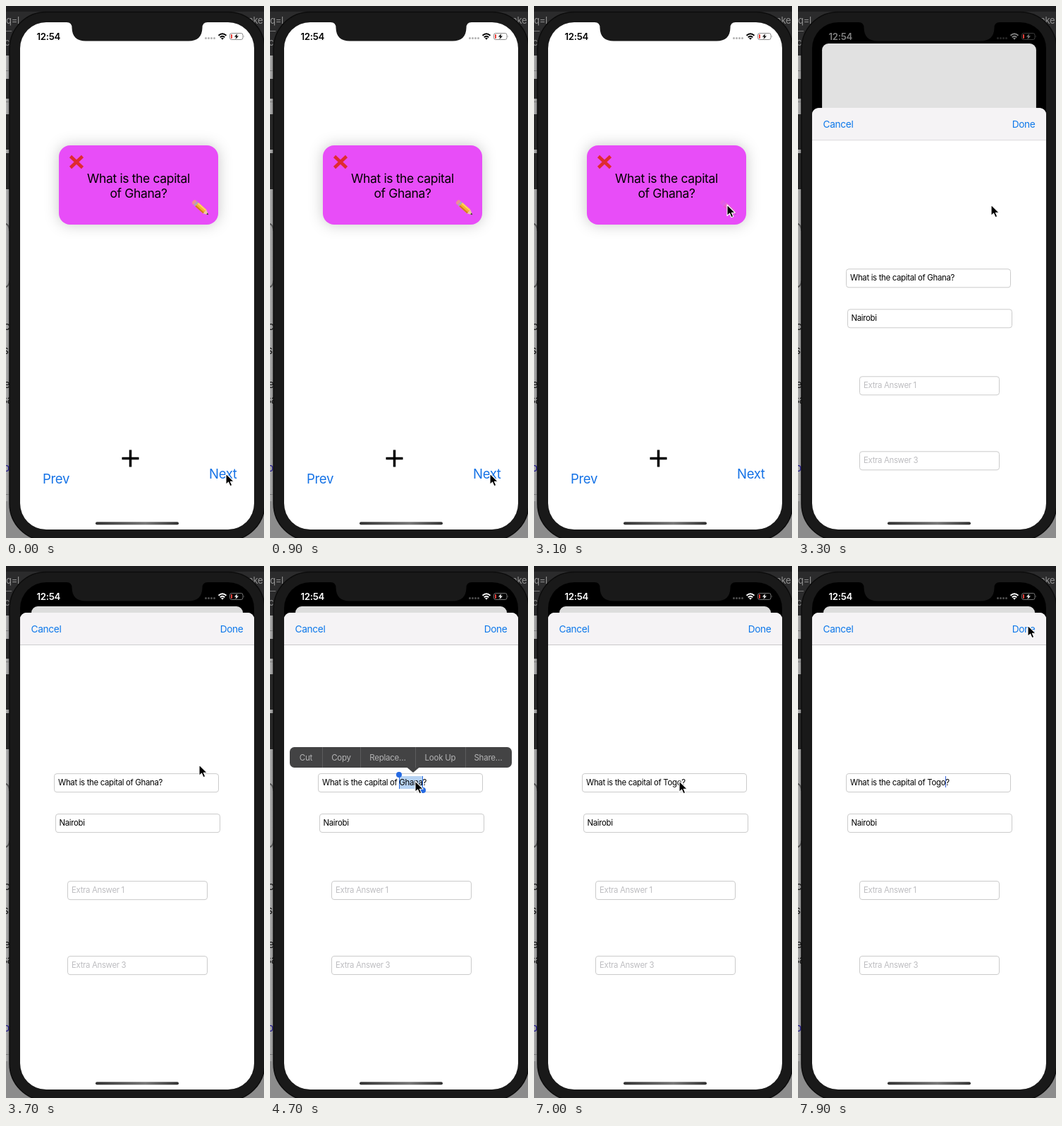
Write an HTML page that moves like this. It is 366 px wide and 752 px high and loops after 8000 ms.

```html
<!DOCTYPE html>
<html lang="en">
<head>
<meta charset="utf-8">
<title>Flashcards</title>
<style>
  html, body { margin: 0; width: 100%; height: 100%; overflow: hidden; background: #1a1a1a; }
  body { font-family: Inter, "Liberation Sans", sans-serif; }
  svg { display: block; }
  text, .text { letter-spacing: -.02em; }
  #stage { position: relative; width: 366px; height: 752px; overflow: hidden; }
  #stage > svg { position: absolute; left: 0; top: 0; }
  #screen { position: absolute; left: 20px; top: 23px; width: 332px; height: 717px;
    border-radius: 37px; overflow: hidden; background: #000; }
  #screen > * { position: absolute; left: 0; top: 0; }
  #page { width: 332px; height: 717px; border-radius: 10px; overflow: hidden;
    background: #fff; transform-origin: 50% 0; }
  #shade { position: absolute; inset: 0; background: #000; }
  #sheet { width: 332px; height: 717px; background: #fff; border-radius: 9px 9px 0 0; }
  #bar { height: 45px; background: #f5f3f5; border-bottom: 1px solid #c9c8ca;
    border-radius: 9px 9px 0 0; }
  #bar span { position: absolute; top: 0; line-height: 46px; font-size: 13.7px; color: #0d78ea; }
  .field { position: absolute; box-sizing: border-box; height: 27px; padding-left: 5px;
    border: 1px solid #cbcbcb; border-radius: 4px; background: #fff;
    font-size: 11.4px; line-height: 25px; white-space: pre; color: #000; }
  .hint { color: #bdbdc0; }
  #caret { position: relative; }
  #caret::after { content: ""; position: absolute; left: -.5px; top: -2px;
    width: 1.5px; height: 16px; background: #3763d8; }
  #word { position: relative; }
  #word.on::before { content: ""; position: absolute; z-index: -1; left: 0; right: 0; top: -2px;
    height: 18px; background: #b7d3f3; border: solid #2a6be0; border-width: 0 1.5px;
    box-sizing: border-box; }
  #question { z-index: 0; }
  .knob { display: none; position: absolute; width: 8px; height: 8px; border-radius: 50%; background: #266ae2; }
  #word.on .knob { display: block; }
  .knob.start { left: -4px; top: -8px; }
  .knob.end { right: -4px; top: 14px; }
</style>
</head>
<body>
<div id="stage">
  <svg width="366" height="752">
    <defs>
      <linearGradient id="strip"><stop stop-color="#b2b2b2"/><stop offset="1" stop-color="#777"/></linearGradient>
    </defs>
    <rect width="366" height="752" fill="#8c8c8c"/>
    <rect width="6" height="700" fill="url(#strip)"/>
    <rect width="366" height="70" fill="#2b2b2c"/>
    <rect width="366" height="8" fill="#1d1d1e"/>
    <path d="M0 35.5H8M0 91.5H6M0 135.5H6M0 690.5H6" stroke="#777"/>
    <g font-size="13" fill="#909090">
      <text x="0" y="25">q=l</text><text x="343" y="25">nke</text><text x="-2" y="56">c</text>
    </g>
    <path d="M-2 307Q5 309 5 318M-2 398Q5 396 5 388" fill="none" stroke="#555" stroke-width="2"/>
    <g font-size="15" fill="#151515">
      <text x="-3" y="458">c</text><text x="-4" y="492">s</text>
      <text x="-3" y="540">e</text><text x="-6" y="562">sa</text>
      <text x="-4" y="658" fill="#221a8c">p</text>
    </g>
    <g fill="#272727">
      <rect x="-2" y="103" width="8" height="28" rx="1"/>
      <rect x="-2" y="153" width="8" height="50" rx="1"/>
      <rect x="-2" y="208" width="8" height="51" rx="1"/>
    </g>
    <rect x="5" y="8.5" width="362" height="747" rx="52" fill="#191919" stroke="#0c0c0c" stroke-width="1.5"/>
  </svg>

  <div id="screen">
    <div id="page">
      <svg width="332" height="717" viewBox="20 23 332 717">
        <rect x="75" y="197" width="226" height="112" rx="16" fill="#e84df8"
          style="filter:drop-shadow(0 0 10px rgba(0,0,0,.22))"/>
        <g font-size="17.5" text-anchor="middle">
          <text x="188" y="249.5">What is the capital</text>
          <text x="188" y="271">of Ghana?</text>
        </g>
        <path d="M91.5 212.5L108.500 228.500M108.500 212.500L91.500 228.500" stroke="#df2b30" stroke-width="4.6"/>
        <g id="pencil" transform="translate(265.500 276) rotate(41.500)">
          <path d="M2-3.500H4V3.500H2Q-.5 3.500-.5 0T2-3.500" fill="#ec8f96"/>
          <path d="M4-3.500H7V3.500H4Z" fill="#a9adb3"/>
          <path d="M7-3.500H22V3.500H7Z" fill="#f6b32e"/>
          <path d="M7-3.500H22V-1.300H7Z" fill="#fdd35c"/>
          <path d="M7 1.500H22V3.500H7Z" fill="#cf7d1e"/>
          <path d="M22-3.500L29 0L22 3.500Z" fill="#eccb9c"/>
          <path d="M26.200-1.400L29 0L26.200 1.400Z" fill="#333"/>
        </g>
        <path d="M164.500 639.500H188.500M176.500 627.500V651.500" stroke="#000" stroke-width="3.5"/>
        <g font-size="18.6" fill="#1673e6">
          <text id="prev" x="52" y="674.500">Prev</text>
          <text id="next" x="288" y="668">Next</text>
        </g>
      </svg>
      <div id="shade"></div>
    </div>

    <div id="sheet" class="text">
      <div id="bar"><span style="left:15.500px">Cancel</span><span style="right:15.500px">Done</span></div>
      <div class="field" id="question" style="left:48px;top:227px;width:234px">What is the capital of <span id="word"><span id="typed"></span><i class="knob start"></i><i class="knob end"></i></span><span id="caret"></span>?</div>
      <div class="field" style="left:49.500px;top:284px;width:234px">Nairobi</div>
      <div class="field hint" style="left:67px;top:379px;width:199px">Extra Answer 1</div>
      <div class="field hint" style="left:67px;top:484.500px;width:199px">Extra Answer 3</div>
    </div>

    <svg width="332" height="717" viewBox="20 23 332 717">
      <g id="menu">
        <rect x="28" y="256" width="315" height="29" rx="6.500" fill="#434344"/>
        <path d="M194 284.500H212L203 292Z" fill="#434344"/>
        <path d="M74.500 256V285M128.500 256V285M206.500 256V285M277.500 256V285" stroke="#5c5c5d"/>
        <g font-size="11.500" fill="#b4b4b5" text-anchor="middle">
          <text x="51" y="274.500">Cut</text><text x="101" y="274.500">Copy</text>
          <text x="167" y="274.500">Replace…</text><text x="241.500" y="274.500">Look Up</text>
          <text x="309.500" y="274.500">Share…</text>
        </g>
      </g>
      <path d="M86 22V23Q93.500 23 93.500 31Q94 49.500 113 49.500H259Q278 49.500 278.500 31Q278.500 23 286 23V22Z" fill="#191919"/>
      <g id="status">
        <text x="43.500" y="47.700" font-size="13.200" font-weight="600">12:54</text>
        <g opacity=".3">
          <circle cx="283.500" cy="45.500" r="1.500"/><circle cx="287.500" cy="45.500" r="1.500"/>
          <circle cx="291.500" cy="45.500" r="1.500"/><circle cx="295.500" cy="45.500" r="1.500"/>
        </g>
        <g fill="none" stroke="currentColor" stroke-width="1.900">
          <path d="M301.500 41.700Q307 36.800 312.500 41.700"/>
          <path d="M303.700 44.200Q307 41.300 310.300 44.200"/>
        </g>
        <path d="M305 45.600Q307 44 309 45.600L307 47.700Z"/>
        <rect x="317.500" y="38.500" width="18.500" height="9" rx="2.600" fill="none" stroke="currentColor" stroke-opacity=".45"/>
        <path d="M337.300 41.500Q338.600 43 337.300 44.500Z" opacity=".5"/>
        <rect x="319" y="40" width="2" height="6" rx=".8" fill="#e8403a"/>
        <path d="M328.200 39.300L323.800 43.600H326.500L325.500 46.900L330 42.400H327.300Z"/>
      </g>
      <linearGradient id="homeTone"><stop stop-color="#333"/><stop offset=".6" stop-color="#777"/><stop offset="1" stop-color="#333"/></linearGradient>
      <rect x="127" y="729.300" width="118" height="4" rx="2" fill="url(#homeTone)"/>
    </svg>
  </div>

  <svg width="366" height="752">
    <path id="pointer" d="M0 0V15.500L3.600 12.200L6 17.700L8.800 16.500L6.400 11.200H11.200Z"
      fill="#000" stroke="#fff" stroke-width="1.100" stroke-linejoin="round"/>
  </svg>
</div>

<script>
const LOOP = 8000, TICK = 100;
const el = id => document.getElementById(id);

// time, x, y of the pointer tip
const pointerPath = [
  [0, 312, 661], [900, 312, 661], [1250, 190, 688], [1500, 64, 675], [1900, 64, 675],
  [2300, 215, 480], [2600, 325, 310], [2900, 274, 281], [3700, 274, 281],
  [4200, 206, 304], [7200, 206, 304], [7900, 326, 84]
];

// time, word in the question field
const typing = [[0, "Ghana"], [5700, "T"], [6300, "To"], [6600, "Tog"], [6800, "Togo"]];

const clamp = v => Math.max(0, Math.min(1, v));
const ramp = (t, from, to) => clamp((t - from) / (to - from));
const smooth = p => p * p * (3 - 2 * p);

function pointAt(t) {
  const i = pointerPath.findIndex(k => k[0] > t);
  if (i < 0) return pointerPath[pointerPath.length - 1].slice(1);
  const [t0, x0, y0] = pointerPath[i - 1], [t1, x1, y1] = pointerPath[i];
  const p = smooth(ramp(t, t0, t1));
  return [x0 + (x1 - x0) * p, y0 + (y1 - y0) * p];
}

// Critically damped spring from 0 to 1
function spring(t, start) {
  const w = Math.max(0, t - start) * 0.0185;
  return 1 - (1 + w) * Math.exp(-w);
}

// Button dims at once, then fades back
function pressed(t, down, up) {
  return t < down ? 1 : 0.2 + 0.8 * ramp(t, up, up + 300);
}

function draw(t) {
  const p = spring(t, 3100);
  el("page").style.transform = `translateY(${34 * p}px) scale(${1 - 0.0964 * p})`;
  el("shade").style.opacity = 0.135 * p;
  el("sheet").style.transform = `translateY(${717 - 674 * p}px)`;
  el("sheet").style.visibility = p > 0 ? "visible" : "hidden";

  const tone = Math.round(255 * ramp(t, 3100, 3500));
  el("status").style.color = el("status").style.fill = `rgb(${tone},${tone},${tone})`;

  el("next").style.opacity = pressed(t, 200, 400);
  el("prev").style.opacity = pressed(t, 1600, 1700);
  el("pencil").style.opacity = pressed(t, 3000, 3200);

  const word = typing.filter(k => k[0] <= t).pop()[1];
  if (el("typed").textContent !== word) el("typed").textContent = word;
  el("word").classList.toggle("on", t >= 4500 && t < 5700);
  const blink = t >= 7000 && t < 7300;
  const caret = (t >= 4200 && t < 4500) || (t >= 5700 && !blink);
  el("caret").style.visibility = caret ? "visible" : "hidden";
  el("menu").style.opacity = ramp(t, 4500, 4700) * (1 - ramp(t, 5600, 5800));

  const [x, y] = pointAt(t);
  el("pointer").setAttribute("transform", `translate(${x} ${y})`);
}

const begin = performance.now();
function frame() {
  const t = (performance.now() - begin) % LOOP;
  draw(Math.floor(t / TICK) * TICK);
  requestAnimationFrame(frame);
}
frame();
</script>
</body>
</html>
```
